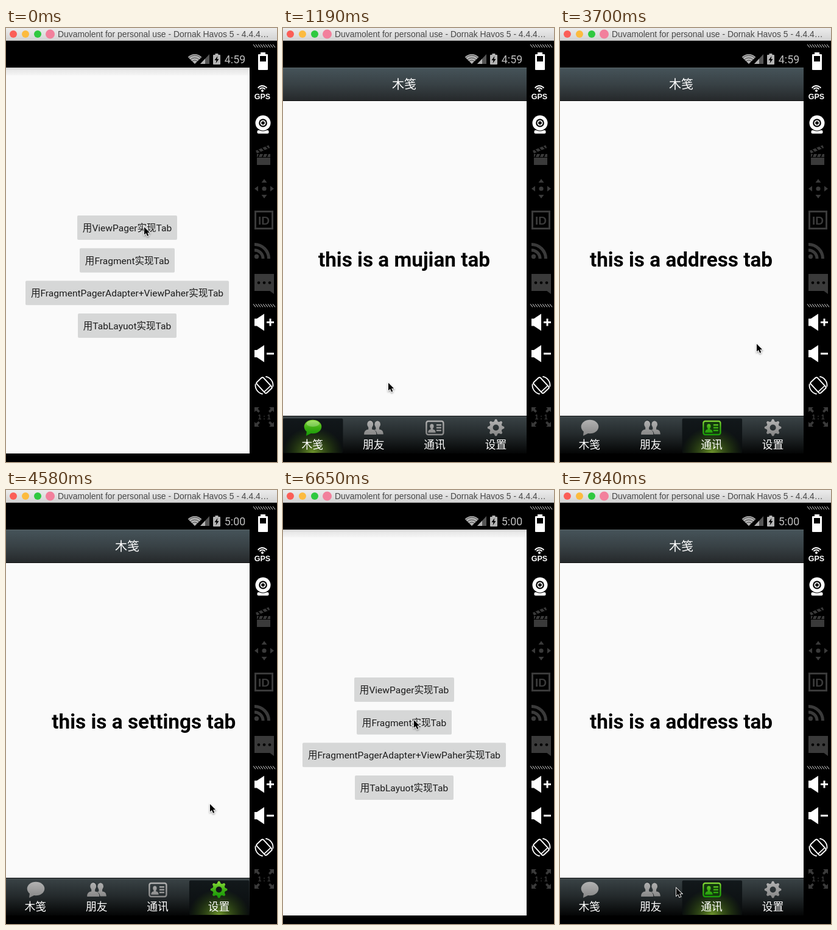
An HTML page with a canvas that plays this animation: 445x713 px, repeating every 7990 ms.

```html
<!DOCTYPE html>
<html lang="zh-CN">
<head>
<meta charset="utf-8">
<title>Tab demo</title>
<style>
html, body { margin: 0; width: 100%; height: 100%; overflow: hidden; background: #000; }
canvas { display: block; width: 445px; height: 713px; }
</style>
</head>
<body>
<canvas id="stage" width="445" height="713"></canvas>
<script>
const LOOP = 7990, TICKS = 54, TICK = LOOP / TICKS;
const UI = 'Roboto, "Noto Sans CJK SC", "Noto Sans CJK", sans-serif';
const MAC = '"Liberation Sans", sans-serif';
const DIM = '#3a3a3a', WHITE = '#fff';
const LABELS = ['木笺', '朋友', '通讯', '设置'];
const PAGES = ['mujian', 'friend', 'address', 'settings'];
const BUTTONS = ['ViewPager', 'Fragment', 'FragmentPagerAdapter+ViewPaher', 'TabLayuot'];
const stage = document.getElementById('stage').getContext('2d');
const layer = document.createElement('canvas');
layer.width = 400;
layer.height = 713;
const layerCtx = layer.getContext('2d');
let c = stage;

// Where the hand stops: tick, x, y
const STOPS = [
  [0, 227, 327], [8, 173, 583], [10, 305, 548], [13, 75, 542], [16, 305, 530], [17, 305, 530],
  [19, 79, 526], [23, 320, 520], [27, 326, 518], [29, 85, 520], [31, 335, 516], [33, 344, 474],
  [34, 344, 474], [38, 253, 322], [45, 215, 378], [50, 231, 667], [52, 229, 666], [53, 191, 654]
];

// Smooth 0 to 1 between two ticks
function ease(t, from, to) {
  const u = Math.min(1, Math.max(0, (t - from) / (to - from)));
  return u * u * (3 - 2 * u);
}
function hand(t) {
  let [, x, y] = STOPS[0];
  for (let i = 1; i < STOPS.length; i++) {
    const [from, x0, y0] = STOPS[i - 1], [to, x1, y1] = STOPS[i], p = ease(t, from, to);
    x += (x1 - x0) * p;
    y += (y1 - y0) * p;
  }
  return [x, y];
}
const swipes = t => ease(t, 10, 14.5) + ease(t, 17, 20.75) + ease(t, 27, 31.76);
const visibility = t => ease(t, 2, 5) - ease(t, 34, 37) + ease(t, 46, 49);

function rect(x, y, w, h, fill, r = 0) {
  c.fillStyle = fill;
  c.beginPath();
  c.roundRect(x, y, w, h, r);
  c.fill();
}
function frame(x, y, w, h, color, lw, r = 0) {
  c.strokeStyle = color;
  c.lineWidth = lw;
  c.beginPath();
  c.roundRect(x, y, w, h, r);
  c.stroke();
}
function oval(x, y, rx, ry, fill) {
  c.fillStyle = fill;
  c.beginPath();
  c.ellipse(x, y, rx, ry, 0, 0, 7);
  c.fill();
}
function dot(x, y, r, fill) { oval(x, y, r, r, fill); }
function poly(fill, ...p) {
  c.fillStyle = fill;
  c.beginPath();
  for (let i = 0; i < p.length; i += 2) c.lineTo(p[i], p[i + 1]);
  c.closePath();
  c.fill();
}
function arc(x, y, r, from, to, color, lw) {
  c.strokeStyle = color;
  c.lineWidth = lw;
  c.beginPath();
  c.arc(x, y, r, from * Math.PI, to * Math.PI);
  c.stroke();
}
function text(s, x, y, font, fill, align = 'center') {
  c.font = font;
  c.fillStyle = fill;
  c.textAlign = align;
  c.fillText(s, x, y);
}
function shade(y0, y1, ...colors) {
  const g = c.createLinearGradient(0, y0, 0, y1);
  colors.forEach((col, i) => g.addColorStop(i / (colors.length - 1), col));
  return g;
}
// Draws in a moved and turned coordinate system
function placed(x, y, angle, paint) {
  c.save();
  c.translate(x, y);
  c.rotate(angle);
  paint();
  c.restore();
}

function titleBar() {
  rect(0, 0, 445, 21, shade(0, 21, '#ececec', '#d2d2d2'));
  rect(0, 20, 445, 1, '#b4b4b4');
  ['#fb5e57', '#fcbb3f', '#2fc940'].forEach((col, i) => dot(12 + 20 * i, 10, 6, col));
  dot(72.5, 10, 7.5, '#f2809c');
  text('Duvamolent for personal use - Dornak Havos 5 - 4.4.4…', 85, 15, '13.9px ' + MAC, '#484848', 'left');
}

function statusBar(clock) {
  const col = '#b4b4b4';
  c.fillStyle = col;
  c.beginPath();
  c.moveTo(310, 59);
  c.arc(310, 59, 16, -.75 * Math.PI, -.25 * Math.PI);
  c.fill();
  for (let r = 6; r < 15; r += 4) arc(310, 59, r, -.76, -.24, '#222', .8);
  poly('#555', 334, 43, 334, 59, 319, 59);
  poly(col, 327, 50.5, 327, 59, 319, 59);
  rect(340, 44, 12, 16, col, 1);
  rect(343.5, 42, 5, 3, col);
  poly('#000', 347.5, 46, 342.5, 53, 345.5, 53, 344.5, 58, 349.5, 51, 346.5, 51);
  text(clock, 376, 58, '17.8px ' + UI, '#bebebe');
}

function hatch(y) {
  c.strokeStyle = '#bbb';
  c.lineWidth = 1.1;
  c.beginPath();
  for (let x = 406; x < 440; x += 4) {
    c.moveTo(x, y);
    c.lineTo(x + 4, y + 5);
  }
  c.stroke();
}

function speaker(y) {
  rect(408, y - 6, 7, 12, WHITE);
  poly(WHITE, 412, y - 6, 424, y - 14, 424, y + 14, 412, y + 6);
  rect(428, y - 1.5, 12, 3, WHITE);
}

function clapper(x, y) {
  rect(x, y + 1, 22, 18, DIM);
  rect(x, y + 6, 22, 1, '#000');
  const stripes = (top, lean) => {
    for (let i = 3; i < 20; i += 7) poly('#000', i, top, i + 2, top, i + 2 + lean, top + 5, i + lean, top + 5);
  };
  placed(x, y, 0, () => stripes(1, -2));
  placed(x, y, -.4, () => {
    rect(0, -5, 23, 5, DIM);
    stripes(-5, 2);
  });
}

function sideBar() {
  hatch(27);
  hatch(453.5);
  rect(418, 40, 8, 4, WHITE);
  rect(414, 43, 16, 26, WHITE, 1);
  rect(417, 46, 10, 9, '#000');
  dot(421, 103, 2, WHITE);
  arc(421, 104, 5.5, -.8, -.2, WHITE, 2);
  arc(421, 104, 9, -.8, -.2, WHITE, 2);
  text('GPS', 421, 117, 'bold 12.5px ' + MAC, WHITE);
  // Webcam
  rect(412.5, 168, 19, 5.5, WHITE, 2);
  dot(422, 156, 13.5, '#000');
  dot(422, 156, 12.5, WHITE);
  dot(422, 156, 6.8, '#000');
  dot(422, 156, 4.6, WHITE);
  dot(422, 156, 2.8, '#000');
  clapper(412, 206);
  // Direction pad
  dot(424, 264, 3.6, DIM);
  for (let i = 0; i < 4; i++) placed(424, 264, i * Math.PI / 2, () => poly(DIM, 0, -16, 4.5, -10, -4.5, -10));
  // Identifier, feed, message
  frame(409.5, 301.5, 28, 28, DIM, 3);
  text('ID', 423.5, 322.5, 'bold 19px ' + MAC, DIM);
  dot(411.5, 375.5, 3.7, DIM);
  arc(408, 379, 14, -.5, 0, DIM, 5);
  arc(408, 379, 23.5, -.5, 0, DIM, 5);
  rect(408, 404, 32, 28, DIM);
  poly(DIM, 432, 431, 440, 431, 440, 437);
  for (let i = -1; i < 2; i++) dot(424 + 9 * i, 418.5, 2.3, '#000');
  // Volume
  speaker(483.5);
  rect(432.5, 477.5, 3, 12, WHITE);
  speaker(535);
  // Rotation
  placed(424, 587, -.75, () => {
    frame(-7.5, -12, 15, 24, WHITE, 2, 2.5);
    rect(-7.5, 7, 15, 1.6, WHITE);
  });
  arc(424, 587, 14.5, -.45, .05, WHITE, 1.8);
  arc(424, 587, 14.5, .55, 1.05, WHITE, 1.8);
  // Full size
  for (let i = 0; i < 4; i++) {
    placed(424, 639, i * Math.PI / 2, () => poly(DIM, -16, -16, -8, -16, -10.5, -13.5, -7, -9.5, -9.5, -7, -13.5, -10.5, -16, -8));
  }
  text('1 : 1', 424, 643, 'bold 10.5px ' + MAC, DIM);
}

function menu() {
  rect(0, 65, 400, 634, '#fafafa');
  rect(0, 65, 400, 13, shade(65, 78, '#cfcfcf', '#e9e9e9', '#eeeeee', '#f6f6f6'));
  c.font = '15.55px ' + UI;
  BUTTONS.forEach((name, i) => {
    const label = `用${name}实现Tab`, w = Math.round(c.measureText(label).width + 18), y = 308 + 53.67 * i;
    rect(199 - w / 2, y, w, 40, '#d6d7d7', 2);
    text(label, 199, y + 26, c.font, '#1c1c1c');
  });
}

function person(x, y, k, fill) {
  oval(x, y - 6 * k, 5 * k, 6 * k, fill);
  rect(x - 3 * k, y - 2 * k, 6 * k, 6 * k, fill);
  rect(x - 10 * k, y + 2.5 * k, 20 * k, 8.5 * k, fill, [7 * k, 7 * k, 0, 0]);
}

function gear(x, y, fill) {
  c.fillStyle = fill;
  c.beginPath();
  for (let i = 0; i < 32; i++) {
    const a = (i - 1.5) * Math.PI / 16, r = i % 4 === 1 || i % 4 === 2 ? 13.8 : 10.5;
    c.lineTo(x + r * Math.cos(a), y + r * Math.sin(a));
  }
  c.closePath();
  c.moveTo(x + 5, y);
  c.arc(x, y, 5, 0, 2 * Math.PI, true);
  c.fill('evenodd');
}

function icon(i, on) {
  const x = 49 + 100.2 * i;
  const fill = on ? shade(643, 670, '#8ee03c', '#3fae14', '#149a08') : shade(643, 670, '#b4b4b4', '#858585');
  if (i === 0) {
    poly(fill, 39, 662, 38, 670, 48, 665);
    oval(x, 655, 14.3, 11.3, fill);
    if (on) oval(x, 650, 10.5, 5, 'rgba(255,255,255,.25)');
  } else if (i === 1) {
    person(x + 6, 657, .95, fill);
    person(x - 5.5, 657, 1.08, '#20272a');
    person(x - 6, 657, 1, fill);
  } else if (i === 2) {
    frame(x - 14, 646, 28, 22, fill, 2.4, 3);
    if (on) rect(x - 12, 648, 24, 18, '#123a0c');
    person(x - 5, 658, .62, fill);
    for (let y = 651; y < 661; y += 4.5) rect(x + 2.5, y, 8, 2.4, fill);
  } else gear(x, 656.5, fill);
}

function highlight(x) {
  rect(x, 641.5, 98.5, 56.5, shade(641, 698, '#12181b', '#0a0d0e'), 2);
  c.save();
  c.beginPath();
  c.rect(x, 641.5, 98.5, 56.5);
  c.clip();
  c.translate(x + 49, 698);
  c.scale(1, .85);
  const glow = c.createRadialGradient(0, 0, 0, 0, 0, 50);
  glow.addColorStop(0, 'rgba(130,175,50,.85)');
  glow.addColorStop(.4, 'rgba(85,125,30,.55)');
  glow.addColorStop(1, 'rgba(50,90,10,0)');
  rect(-50, -70, 100, 70, glow);
  c.restore();
}

function tabScreen(selected, pos) {
  rect(0, 65, 400, 634, '#fafafa');
  PAGES.forEach((name, i) => {
    text(`this is a ${name} tab`, 199 + (i - pos) * 400, 392, 'bold 33.3px ' + UI, '#000');
  });
  rect(0, 65, 400, 55, shade(65, 120, '#46545a', '#384145', '#25282a'));
  rect(0, 65, 400, 1, '#5b666a');
  rect(0, 119, 400, 1, '#0c0c0c');
  text(LABELS[0], 199, 100, '20px ' + UI, WHITE);
  rect(0, 637, 400, 62, shade(637, 699, '#3b4447', '#23292b', '#040505'));
  rect(0, 637, 400, 1.5, '#171a1b');
  rect(0, 638.5, 400, 1, '#4c5558');
  highlight(100.3 * selected);
  LABELS.forEach((s, i) => {
    icon(i, i === selected);
    text(s, 48.3 + 100.4 * i, 691, '17.8px ' + UI, WHITE);
  });
}

function pointer(x, y) {
  c.save();
  c.translate(x, y);
  c.scale(.87, .87);
  c.shadowColor = 'rgba(0,0,0,.4)';
  c.shadowBlur = 3;
  c.shadowOffsetY = 1.5;
  c.strokeStyle = WHITE;
  c.lineWidth = 2;
  const arrow = new Path2D('M0 0V14.5L3.4 11.4L5.9 17L8.4 16L6 10.5H10.6Z');
  c.stroke(arrow);
  c.shadowColor = 'transparent';
  c.fillStyle = '#000';
  c.fill(arrow);
  c.restore();
}

function draw(t) {
  const second = t > 37;
  const pos = !second ? swipes(t) : t < 52 ? 0 : 2;
  const shown = visibility(t);

  c = stage;
  rect(0, 0, 445, 713, '#000');
  titleBar();
  statusBar(t < 28 ? '4:59' : '5:00');
  sideBar();
  if (shown < 1) menu();
  if (shown > 0) {
    c = layerCtx;
    c.clearRect(0, 0, 400, 713);
    tabScreen(Math.floor(pos + .3), pos);
    c = stage;
    c.save();
    c.globalAlpha = shown;
    c.beginPath();
    c.rect(0, 65, 400, 634);
    c.clip();
    const k = .8 + .2 * shown;
    c.translate(200, 382);
    c.scale(k, k);
    c.drawImage(layer, -200, -382);
    c.restore();
  }
  pointer(...hand(t));
}

const start = performance.now();
function loop() {
  const ms = (performance.now() - start) % LOOP;
  draw(Math.min(TICKS - 1, Math.floor((ms + 10) / TICK)));
  requestAnimationFrame(loop);
}
loop();
</script>
</body>
</html>
```
